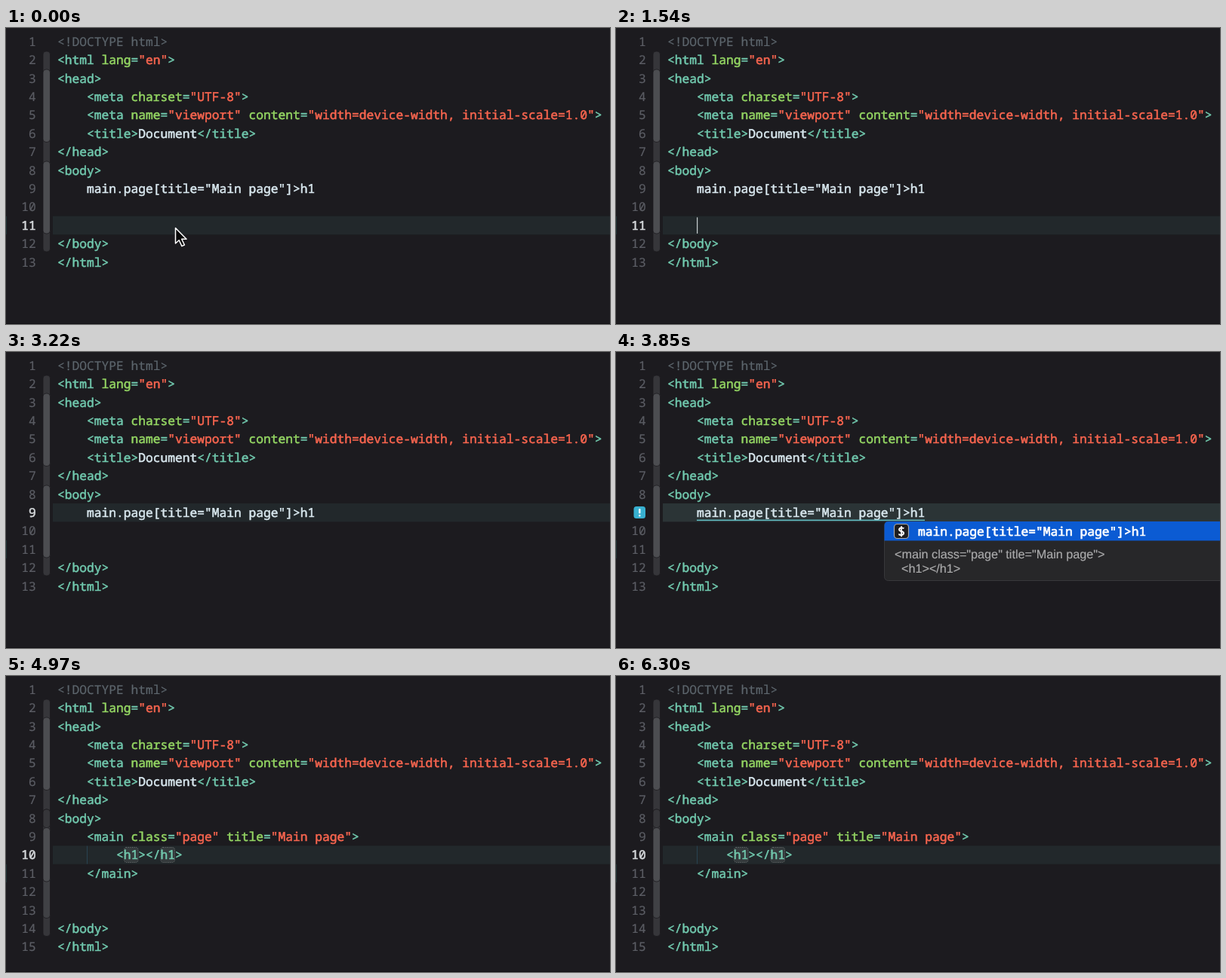
Recreate the animation shown at these times as an HTML page. Size 800 px wide and 393 px high, loop 6.37 s.

```html
<!DOCTYPE html>
<html lang="en">
<head>
<meta charset="UTF-8">
<title>Abbreviation expansion</title>
<style>
html, body { margin: 0; width: 100%; height: 100%; overflow: hidden; background: #1c1b1f; }
svg { display: block; width: 800px; height: 393px; }
text { font: 16.25px "Noto Sans Mono", "DejaVu Sans Mono", monospace; white-space: pre; text-rendering: geometricPrecision; font-variant-ligatures: none; }
text, tspan { fill: currentColor; stroke: currentColor; stroke-width: 0.55px; }
.doc { color: #5d666d; stroke-width: 0.2px; }
.str { color: #f8654f; }
.attr { color: #94d663; }
.tag { color: #71c9ae; }
.plain { color: #d9e8ef; }
.num { color: #5b5d64; text-anchor: end; stroke-width: 0.2px; }
.now { color: #d3d6d9; stroke-width: 0.6px; }
.pick { color: #fff; stroke-width: 0.7px; }
.hint { font: 16.2px "Liberation Sans", Arial, sans-serif; color: #acacad; stroke-width: 0.15px; }
</style>
</head>
<body>
<svg id="stage" viewBox="0 0 800 393"></svg>
<script>
const NS = "http://www.w3.org/2000/svg";
const LOOP = 6370, LEFT = 68, CHAR = 9.75, PITCH = 24.4;
const stage = document.getElementById("stage");

function add(parent, name, attrs, content) {
  const node = document.createElementNS(NS, name);
  for (const key in attrs) node.setAttribute(key, attrs[key]);
  if (content) node.textContent = content;
  return parent.appendChild(node);
}
const group = parent => add(parent, "g", {});
const rect = (parent, x, y, width, height, fill, more) =>
  add(parent, "rect", { x, y, width, height, fill, ...more });
const baseline = n => 23.7 + PITCH * (n - 1);
const rowTop = n => 5.8 + PITCH * (n - 1);

const TOKENS = /(<!.*>)|("[^"]*")|([a-z]+(?==))|(<\/?\w*|[>=])|([^<>="]+?(?=[a-z]+=|[<>="]|$))/g;
const KINDS = ["doc", "str", "attr", "tag", "plain"];

function codeLine(parent, n, indent, source) {
  const text = add(parent, "text", { x: LEFT + CHAR * indent, y: baseline(n) });
  for (const match of source.matchAll(TOKENS)) {
    const kind = KINDS[match.slice(1).findIndex(Boolean)];
    add(text, "tspan", { class: kind }, match[0]);
  }
}

function numbers(parent, last, current, skip) {
  for (let n = 1; n <= last; n++) {
    if (n === skip) continue;
    add(parent, "text", { class: n === current ? "num now" : "num", x: 39.8, y: baseline(n) }, n);
  }
}

function fold(parent, top, bottom, fill) {
  rect(parent, 49, top, 9.5, bottom - top, fill, { rx: 4, stroke: "#1c1b1f", "stroke-width": 0.8 });
}

const highlight = (parent, n, fill = "#22282b") =>
  rect(parent, 62, rowTop(n), 738, PITCH, fill);
const caretAt = (x, n) => rect(stage, x, rowTop(n) + 1.6, 1.2, 21.5, "#c9d0d3");

const DARK = "#36363a", MID = "#404145", LIGHT = "#4c4d51";

// Backdrops of the active line
const rowLow = group(stage), rowUp = group(stage), rowOffer = group(stage), rowDone = group(stage);
highlight(rowLow, 11);
highlight(rowUp, 9);
highlight(rowOffer, 9, "#2b3436");
highlight(rowDone, 10);
numbers(rowLow, 13, 11);
numbers(rowUp, 13, 9);
numbers(rowOffer, 13, 0, 9);
numbers(rowDone, 15, 10);
rect(stage, 0, 250, 1, 24, "#1f3334");

// Lines that never change
[
  [0, "<!DOCTYPE html>"],
  [0, '<html lang="en">'],
  [0, "<head>"],
  [4, '<meta charset="UTF-8">'],
  [4, '<meta name="viewport" content="width=device-width, initial-scale=1.0">'],
  [4, "<title>Document</title>"],
  [0, "</head>"],
  [0, "<body>"]
].forEach(([indent, source], i) => codeLine(stage, i + 1, indent, source));

const ABBR = 'main.page[title="Main page"]>h1';
const before = group(stage);
fold(before, 31, 297, DARK);
fold(before, 55, 151.5, LIGHT);
fold(before, 177, 273, LIGHT);
add(before, "text", { class: "plain", x: LEFT + CHAR * 4, y: baseline(9) }, ABBR);
codeLine(before, 12, 0, "</body>");
codeLine(before, 13, 0, "</html>");

const after = group(stage);
fold(after, 31, 345.5, DARK);
fold(after, 55, 151.5, LIGHT);
const foldFlat = group(after), foldNested = group(after);
fold(foldFlat, 177, 321.5, LIGHT);
fold(foldNested, 177, 321.5, MID);
fold(foldNested, 177, 201.5, DARK);
fold(foldNested, 201.5, 273, LIGHT);
rect(after, 107, 225.6, 1, 24, "#294250");
for (const x of [156.5, 205])
  rect(after, x, 227.5, 18.5, 20, "#343a3c", { rx: 3, stroke: "#747879", "stroke-dasharray": "1 1.5" });
codeLine(after, 9, 4, '<main class="page" title="Main page">');
codeLine(after, 10, 8, "<h1></h1>");
codeLine(after, 11, 4, "</main>");
codeLine(after, 14, 0, "</body>");
codeLine(after, 15, 0, "</html>");

// Completion offer
const offer = group(stage);
rect(offer, 107, 222.6, 302, 1.5, "#62bfc5");
rect(offer, 23.5, 205, 15.5, 16, "#38b0d0", { rx: 3.5 });
rect(offer, 30.1, 208, 2.4, 6.5, "#fff", { rx: 1 });
rect(offer, 30.1, 216, 2.4, 2.4, "#fff", { rx: 1 });
rect(offer, 355.5, 225, 460, 78.5, "#272729", { rx: 5, stroke: "#38383b" });
add(offer, "path", { d: "M800 225H361Q355.5 225 355.5 230.5V250.5H800Z", fill: "#0b5bd3" });
rect(offer, 368.5, 228.5, 19, 19, "#1d1d1f", { rx: 4, stroke: "#a9a9ab", "stroke-width": 1.2 });
add(offer, "text", { class: "pick", x: 378, y: 243.5, "text-anchor": "middle" }, "$");
add(offer, "text", { class: "pick", x: 400, y: 243.7 }, ABBR);
add(offer, "text", { class: "hint", x: 369, y: 274.3 }, '<main class="page" title="Main page">');
add(offer, "text", { class: "hint", x: 378, y: 293.3 }, "<h1></h1>");

const caretLow = caretAt(107, 11), caretUp = caretAt(409, 9), caretDone = caretAt(184.6, 10);
const pointer = add(stage, "path", {
  d: "M224.5 265.5V286L229.2 281.7L232.9 289.6L236.4 288L232.7 280.3H239Z",
  fill: "#080808", stroke: "#fff", "stroke-width": 1.5, "stroke-linejoin": "round"
});
rect(stage, 0, 392, 800, 1, "#111014");

// Each part with the times at which it shows and hides in turn
const EXPAND = 4270, MOVE = 3150, OFFER = 3640;
const plan = [
  [pointer, 0, 700],
  [rowLow, 0, MOVE],
  [rowUp, MOVE, OFFER],
  [rowOffer, OFFER, EXPAND],
  [offer, OFFER, EXPAND],
  [rowDone, EXPAND, LOOP],
  [before, 0, EXPAND],
  [after, EXPAND, LOOP],
  [foldFlat, EXPAND, 4690],
  [foldNested, 4690, LOOP],
  [caretLow, 350, 910, 1470, 2030, 2590, MOVE],
  [caretUp, 3290, OFFER],
  [caretDone, EXPAND, 4830, 5390, 5950]
];

function draw(now) {
  const t = now % LOOP;
  for (const [node, ...edges] of plan) {
    const shown = edges.filter(edge => edge <= t).length % 2 === 1;
    node.style.display = shown ? "" : "none";
  }
  requestAnimationFrame(() => draw(performance.now() - start));
}
const start = performance.now();
draw(0);
</script>
</body>
</html>
```
